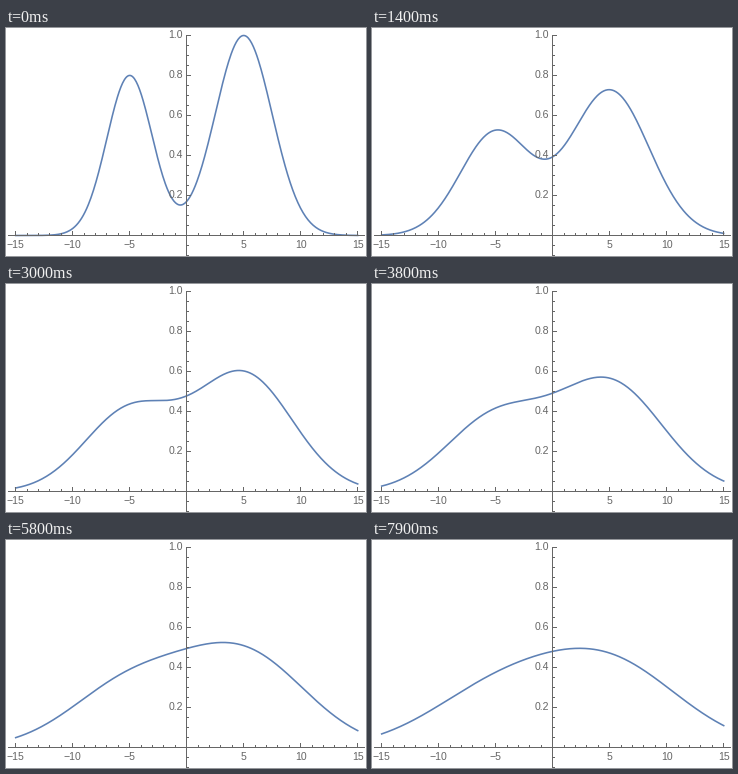
A matplotlib script for the animation above (8000 ms loop, 360 by 228 pixels).

```python
import numpy as np
import matplotlib.pyplot as plt
from matplotlib.animation import FuncAnimation

W, H, DPI = 360, 228, 72  # at 72 dpi one point is one pixel
FRAMES, STEP = 80, 100
X0, Y0 = 180.7, 207.5     # origin of the plot in pixels
SX, SY = 11.4, 200        # pixels per unit
BLUE, GRAY = "#5e81b5", "#666666"
SPREAD = 0.4              # variance gained per frame

plt.rcParams["font.family"] = "Liberation Sans"


def px(x):
    return X0 + SX * x


def py(y):
    return Y0 - SY * y


def mid(v):
    """Centre of the pixel that holds v."""
    return np.floor(v) + 0.5


def bump(x, height, center, var, grown):
    """Gaussian after diffusing, keeping its area."""
    total = var + grown
    return height * np.sqrt(var / total) * np.exp(-(x - center) ** 2 / (2 * total))


def heat(x, frame):
    q = SPREAD * frame
    return bump(x, 0.8, -5, 4, q) + bump(x, 1, 5, 6.25, q)


fig = plt.figure(figsize=(W / DPI, H / DPI), dpi=DPI, facecolor="white")
ax = fig.add_axes([0, 0, 1, 1])
ax.set(xlim=(0, W), ylim=(H, 0))
ax.axis("off")


def rule(xs, ys):
    ax.plot(xs, ys, color=GRAY, lw=1, solid_capstyle="butt", snap=False, zorder=3)


def label(x, y, text, ha):
    ax.text(x, y, text, size=10.5, color=GRAY, ha=ha, va="center_baseline", zorder=4)


left, base = mid(X0), mid(Y0)
rule([2, 359], [base, base])
rule([left, left], [7, H])

for x in range(-15, 16):
    major = x % 5 == 0
    rule([mid(px(x))] * 2, [base, base - (4.5 if major else 2.5)])
    if major and x:
        label(px(x), 216.5, str(x).replace("-", "\u2212"), "center")

for k in range(-2, 21):
    y = k / 20
    major = k % 4 == 0
    rule([left, left + (4.5 if major else 2.5)], [mid(py(y))] * 2)
    if major and k:
        label(177, py(y) - 1, f"{y:.1f}", "right")

xs = np.linspace(-15, 15, 401)
curve, = ax.plot([], [], color=BLUE, lw=1.6, zorder=2)


def draw(frame):
    curve.set_data(px(xs), py(heat(xs, frame)))
    return curve,


anim = FuncAnimation(fig, draw, frames=FRAMES, interval=STEP,
                     repeat=True, repeat_delay=0, blit=False)
plt.show()
```
